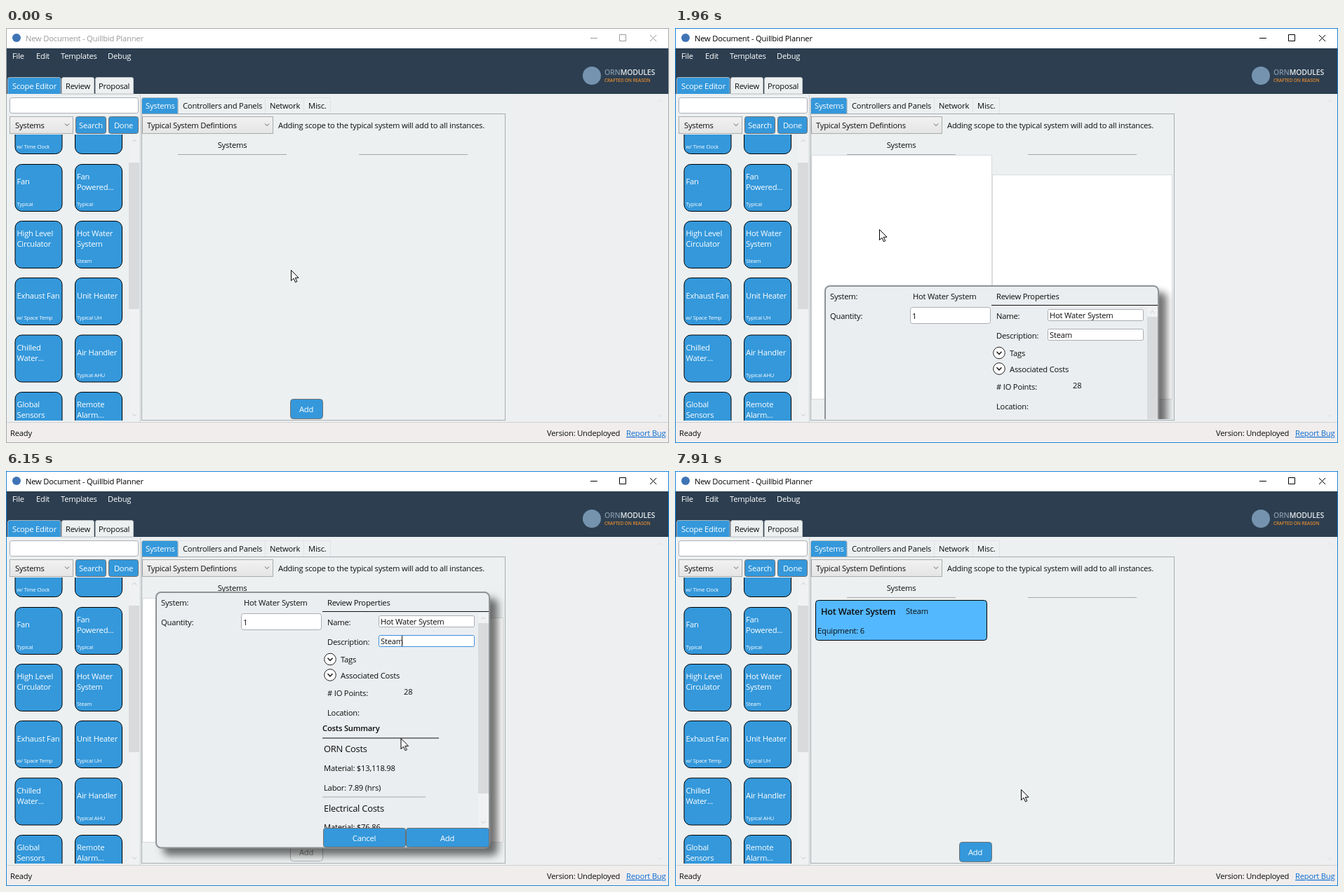
An HTML page for the animation above (7.99 s loop, 945 by 592 pixels).

```html
<!DOCTYPE html>
<html lang="en">
<head>
<meta charset="utf-8">
<title>Scope editor</title>
<style>
html, body { margin: 0; width: 100%; height: 100%; overflow: hidden; background: #ecf0f1; }
svg { display: block; width: 945px; height: 592px; }
text { font: 11.2px "Open Sans", "Noto Sans", sans-serif; letter-spacing: -.018em; fill: #0c0c0c; white-space: pre; }
.w, .tile text { fill: #fff; }
.mid { text-anchor: middle; }
.big { font-size: 12.9px; }
.bold { font-weight: 600; }
.tile .sub, .sub { font-size: 7.5px; }
.box { fill: #fff; stroke: #abadb3; }
.btn { fill: #3498db; stroke: #707070; }
.tab { fill: #3498db; stroke: #acb4ba; }
.combo { fill: url(#shade); stroke: #acacac; }
.thin { fill: none; stroke: #606060; }
.pale { fill: none; stroke: #c4c6c8; }
.rule { stroke: #a5a9ac; }
.ink { stroke: #111; }

/* one shared clock for every moving part */
.t { animation: none 7.99s step-end infinite; }
#caption { animation-name: wake; }
#frame { animation-name: frame; }
#arrow { animation-name: travel, arrow; }
#beam { animation-name: hop, beam; }
#drag { animation-name: drag; }
#lists { animation-name: lists; }
#item { animation-name: item; }
#itemText { animation-name: undim; }
#modal { animation-name: slide; }
#nameBox { animation-name: nameBox; }
#noteBox { animation-name: noteBox; }
#nameCaret { animation-name: nameCaret; }
#noteCaret { animation-name: noteCaret; }
#cancel { animation-name: cancel; }
#confirm { animation-name: confirm; }

@keyframes wake { 0% { color: #9a9a9a } 9.51%, 100% { color: #000 } }
@keyframes frame { 0% { stroke: #a6a9ab } 9.51%, 100% { stroke: #1883d7 } }
@keyframes drag { 0%, 21.15%, 100% { opacity: 0 } 10.51% { opacity: 1 } }
@keyframes lists { 0%, 90.36%, 100% { opacity: 0 } 23.26% { opacity: 1 } }
@keyframes item { 0% { opacity: 0 } 86.48%, 100% { opacity: 1 } }
@keyframes undim { 0% { opacity: .4 } 90.36%, 100% { opacity: 1 } }
@keyframes arrow { 0%, 74.71%, 100% { opacity: 1 } 37.79% { opacity: 0 } }
@keyframes beam { 0%, 74.71%, 100% { opacity: 0 } 37.79% { opacity: 1 } }
@keyframes nameBox { 0%, 62.07%, 100% { stroke: #abadb3 } 37.79% { stroke: #7eb4ea } 42.55% { stroke: #3d8fdd } }
@keyframes noteBox { 0%, 86.48%, 100% { stroke: #abadb3 } 57.07% { stroke: #7eb4ea } 62.07% { stroke: #3d8fdd } }
@keyframes nameCaret { 0%, 49.43%, 62.07%, 100% { opacity: 0 } 42.55%, 56.07% { opacity: 1 } }
@keyframes noteCaret { 0%, 68.96%, 82.47%, 100% { opacity: 0 } 62.07%, 75.59% { opacity: 1 } }
@keyframes cancel { 0%, 80.47%, 100% { fill: #3498db } 79.47% { fill: #bee6fd } }
@keyframes confirm { 0%, 90.36%, 100% { fill: #3498db } 80.47% { fill: #bee6fd } }
@keyframes slide {
  0%, 90.36%, 100% { transform: translateY(420px) }
  23.26% { transform: translateY(292px) }
  24.28% { transform: translateY(195px) }
  25.15% { transform: translateY(98px) }
  26.15% { transform: none }
  88.48% { transform: translateY(130px) }
  89.36% { transform: translateY(260px) }
}
@keyframes hop {
  0% { transform: translate(578px, 211px) }
  55.19% { transform: translate(578px, 211px); animation-timing-function: steps(4, start) }
  59.07%, 100% { transform: translate(577px, 247px) }
}
@keyframes travel {
  0% { transform: translate(406px, 345px) }
  4.75% { transform: translate(406px, 345px); animation-timing-function: steps(2, start) }
  6.63% { transform: translate(290px, 338px); animation-timing-function: steps(3, start) }
  9.51% { transform: translate(127px, 311px) }
  10.51% { transform: translate(127px, 311px); animation-timing-function: steps(5, start) }
  15.39% { transform: translate(161px, 286px); animation-timing-function: steps(2, start) }
  17.26% { transform: translate(233px, 282px); animation-timing-function: steps(1, start) }
  18.27% { transform: translate(269px, 280px); animation-timing-function: steps(3, start) }
  21.15% { transform: translate(291px, 287px) }
  33.16% { transform: translate(291px, 287px); animation-timing-function: steps(1, start) }
  34.16% { transform: translate(288px, 285px); animation-timing-function: steps(4, start) }
  37.79% { transform: translate(545px, 200px) }
  74.71% { transform: translate(577px, 247px); animation-timing-function: steps(6, start) }
  80.47% { transform: translate(548px, 515px); animation-timing-function: steps(3, start) }
  83.47% { transform: translate(617px, 512px) }
  84.6% { transform: translate(617px, 514px) }
  93.24% { transform: translate(617px, 514px); animation-timing-function: steps(3, start) }
  96.15% { transform: translate(545px, 450px); animation-timing-function: steps(2, start) }
  98.07% { transform: translate(505px, 444px); animation-timing-function: steps(2, start) }
  100% { transform: translate(481px, 464px) }
}
</style>
</head>
<body>
<svg viewBox="0 0 945 592">
<defs>
  <linearGradient id="shade" x2="0" y2="1"><stop stop-color="#f1f1f1"/><stop offset="1" stop-color="#e5e5e5"/></linearGradient>
  <rect id="card" x=".5" y=".5" width="67" height="67" rx="9.500" fill="#3498db" stroke="#000"/>
  <path id="down" d="M-3-1.5l3 3 3-3"/>
  <path id="up" d="M-3 1.5l3-3 3 3"/>
  <g id="expander"><circle r="8.3" fill="#fff" stroke="#222"/><path d="M-3.5-1.7l3.5 3.5 3.5-3.5" fill="none" stroke="#222" stroke-width="1.6"/></g>
  <clipPath id="side"><path d="M0 152h192v408H0z"/></clipPath>
  <clipPath id="stage"><path d="M194 123h517v435H194z"/></clipPath>
  <clipPath id="props"><path d="M450 202h240v307H450z"/></clipPath>
</defs>

<!-- window -->
<rect width="945" height="592" fill="#ecf0f1"/>
<rect width="945" height="29" fill="#fff"/>
<rect y="29" width="945" height="65" fill="#2c3e50"/>
<circle cx="15" cy="14" r="6" fill="#3f74b5"/>
<g id="caption" class="t">
  <text x="28" y="19" style="fill:currentColor">New Document - Quillbid Planner</text>
  <path d="M833 14.5h10M874.500 9.500h9v9h-9zM918 10l9 9m0-9l-9 9" fill="none" stroke="currentColor"/>
</g>
<text class="w" x="9" y="44">File</text><text class="w" x="43" y="44">Edit</text>
<text class="w" x="78" y="44">Templates</text><text class="w" x="145" y="44">Debug</text>
<circle cx="835" cy="68" r="13" fill="#7593ae"/>
<text x="853" y="67" class="bold" style="font-size:10.500px;fill:#e4e8eb"><tspan fill="#8296a8">ORN</tspan>MODULES</text>
<text x="853" y="77" class="bold" style="font-size:6.500px;fill:#e0892f">CRAFTED ON REASON</text>

<path class="tab" d="M2.500 94V73q0-2.500 2.500-2.500h70.500q2.500 0 2.500 2.500v21"/>
<path d="M79.500 94V73q0-2.500 2.500-2.500h41q2.500 0 2.500 2.500v21zM127.500 94V73q0-2.500 2.500-2.500h49q2.500 0 2.500 2.500v21z" fill="#ecf0f1" stroke="#b8bcbf"/>
<text class="w" x="9" y="87">Scope Editor</text><text x="85" y="87">Review</text><text x="132" y="87">Proposal</text>

<!-- right pane and status bar -->
<path d="M714 95h230v467H714z" fill="#eeeff0"/>
<g class="pale" style="stroke:#dcdedf"><use href="#up" x="933" y="104"/><use href="#down" x="933" y="553"/></g>
<path d="M0 562h945v30H0z" fill="#f1eded"/><path d="M0 562.500h945" stroke="#d0d2d3"/>
<text x="6" y="582">Ready</text><text x="771" y="582">Version: Undeployed</text>
<text x="884" y="582" style="fill:#0a6bd0;text-decoration:underline">Report Bug</text>

<!-- sidebar -->
<rect class="box" x="5.500" y="99.500" width="183" height="22" rx="3"/>
<rect class="combo" x="5.500" y="126.500" width="90" height="24"/>
<text x="13" y="143">Systems</text><use href="#down" x="87" y="138" class="thin"/>
<rect class="btn" x="99.500" y="126.500" width="43" height="24" rx="3"/>
<rect class="btn" x="146.500" y="126.500" width="42" height="24" rx="3"/>
<text class="w mid" x="121" y="143">Search</text><text class="w mid" x="167.500" y="143">Done</text>
<path d="M175 152h15v408h-15z" fill="#eff1f2"/><path d="M175 192h15v209h-15z" fill="#d8dadb"/>
<g class="pale"><use href="#up" x="183" y="161"/><use href="#down" x="183" y="552"/></g>
<g clip-path="url(#side)">
  <g class="tile" transform="translate(12.500 112)"><use href="#card"/><text class="sub" x="3" y="60">w/ Time Clock</text></g>
  <g class="tile" transform="translate(98 112)"><use href="#card"/></g>
  <g class="tile" transform="translate(12.500 194)"><use href="#card"/><text x="3" y="29">Fan</text><text class="sub" x="3" y="59.500">Typical</text></g>
  <g class="tile" transform="translate(98 194)"><use href="#card"/><text x="3" y="22">Fan<tspan x="3" dy="15">Powered...</tspan></text><text class="sub" x="3" y="59.500">Typical</text></g>
  <g class="tile" transform="translate(12.500 275)"><use href="#card"/><text x="3" y="22">High Level<tspan x="3" dy="15">Circulator</tspan></text></g>
  <g class="tile" transform="translate(98 275)"><use href="#card"/><text x="3" y="22">Hot Water<tspan x="3" dy="15">System</tspan></text><text class="sub" x="3" y="60">Steam</text></g>
  <g class="tile" transform="translate(12.500 356)"><use href="#card"/><text x="3" y="29.500">Exhaust Fan</text><text class="sub" x="3" y="60">w/ Space Temp</text></g>
  <g class="tile" transform="translate(98 356)"><use href="#card"/><text x="3" y="29.500">Unit Heater</text><text class="sub" x="3" y="60">Typical UH</text></g>
  <g class="tile" transform="translate(12.500 437.500)"><use href="#card"/><text x="3" y="22">Chilled<tspan x="3" dy="15">Water...</tspan></text></g>
  <g class="tile" transform="translate(98 437.500)"><use href="#card"/><text x="3" y="29.500">Air Handler</text><text class="sub" x="3" y="60">Typical AHU</text></g>
  <g class="tile" transform="translate(12.500 519)"><use href="#card"/><text x="3" y="22">Global<tspan x="3" dy="15">Sensors</tspan></text></g>
  <g class="tile" transform="translate(98 519)"><use href="#card"/><text x="3" y="22">Remote<tspan x="3" dy="15">Alarm...</tspan></text></g>
</g>
<path d="M191.500 95v467" stroke="#c9cdcf"/>

<!-- main panel -->
<rect x="193.500" y="122.500" width="518" height="437" fill="#ecf0f1" stroke="#a9adb0"/>
<path d="M245.500 122V99.500H369.500V122M369.500 99.500h55V122M424.500 99.500h38V122" fill="none" stroke="#dfe3e5"/>
<path class="tab" d="M193.500 122v-20q0-2.500 2.500-2.500h46.500q2.500 0 2.500 2.500v20"/>
<text class="w" x="199" y="115">Systems</text><text x="252" y="115">Controllers and Panels</text>
<text x="376" y="115">Network</text><text x="431" y="115">Misc.</text>
<rect class="combo" x="194.500" y="126.500" width="186" height="24"/>
<text x="201" y="143">Typical System Defintions</text><use href="#down" x="372" y="138" class="thin"/>
<text x="388" y="143">Adding scope to the typical system will add to all instances.</text>
<text class="mid" x="322.500" y="171">Systems</text>
<path class="rule" d="M245 180.500h155M503 180.500h155"/>
<rect class="btn" x="405.500" y="529.500" width="46" height="28" rx="4"/>
<text class="w mid" x="428" y="548">Add</text>
<g id="lists" class="t">
  <path d="M194.500 181.500h257v348h-257zM452.500 209.500h256v320h-256z" fill="#fff" stroke="#d9dbdc"/>
  <path d="M194 530h516v28H194z" fill="#ecf0f1"/>
  <rect x="405.500" y="529.500" width="46" height="27" rx="4" fill="#f2f3f3" stroke="#adb2b5"/>
  <text class="mid" x="428" y="548" style="fill:#838383">Add</text>
</g>
<g id="item" class="t">
  <rect x="200.500" y="184.500" width="244" height="57" rx="4" fill="#54b8ff" stroke="#000"/>
  <g id="itemText" class="t">
    <text x="208" y="205" class="bold" style="font-size:12.700px">Hot Water System</text>
    <text x="329" y="204">Steam</text><text x="203" y="232">Equipment: 6</text>
  </g>
</g>

<!-- review dialog -->
<g clip-path="url(#stage)">
<g id="modal" class="t">
  <rect x="214" y="173" width="475" height="364.500" rx="7" fill="#ebeef0" stroke="#8f9396" stroke-width="2" style="filter:drop-shadow(11px 10px 5.5px rgba(0,0,0,.55))"/>
  <text x="221" y="192">System:</text><text x="339" y="192">Hot Water System</text>
  <text x="221" y="220">Quantity:</text>
  <rect class="box" x="335.500" y="203.500" width="114" height="23" rx="3"/><text x="338" y="220">1</text>
  <text x="458" y="192">Review Properties</text><path class="ink" d="M451 200.500h237"/>
  <text x="458" y="220">Name:</text><text x="458" y="248">Description:</text>
  <rect id="nameBox" class="box t" x="531.500" y="206.500" width="136" height="16" rx="2"/>
  <rect id="noteBox" class="box t" x="531.500" y="234.500" width="136" height="16" rx="2"/>
  <text x="534" y="219">Hot Water System</text><text x="534" y="247">Steam</text>
  <path id="nameCaret" class="ink t" d="M574.500 207v15"/>
  <path id="noteCaret" class="ink t" d="M564.500 235v15"/>
  <use href="#expander" x="462" y="268.500"/><text x="477" y="273">Tags</text>
  <use href="#expander" x="462" y="291"/><text x="477" y="296">Associated Costs</text>
  <text x="458" y="321"># IO Points:</text><text x="567" y="319">28</text>
  <text x="458" y="349">Location:</text>
  <text x="451" y="371" class="bold">Costs Summary</text><path class="ink" d="M451 381h166"/>
  <text x="453" y="401" class="big">ORN Costs</text>
  <text x="453" y="428">Material: $13,118.98</text><text x="453" y="456">Labor: 7.89 (hrs)</text>
  <path class="rule" d="M451 465h147"/>
  <text x="453" y="485.500" class="big">Electrical Costs</text>
  <g clip-path="url(#props)"><text x="453" y="512">Material: $76.86</text></g>
  <path d="M673 202h15v306h-15z" fill="#eff1f2"/><path d="M673 217h15v243h-15z" fill="#d8dadb"/>
  <g class="pale"><use href="#up" x="680.500" y="210"/><use href="#down" x="680.500" y="501"/></g>
  <rect id="cancel" class="btn t" x="452.500" y="509.500" width="117" height="27" rx="3"/>
  <rect id="confirm" class="btn t" x="570.500" y="509.500" width="118" height="27" rx="3"/>
  <text class="w mid" x="510.500" y="527.500">Cancel</text><text class="w mid" x="629" y="527.500">Add</text>
</g>
</g>

<rect id="frame" class="t" x=".5" y=".5" width="944" height="591" fill="none"/>

<!-- pointers -->
<g id="beam" class="t"><path d="M-3-6.500h2.500l.5.500.5-.5H3M0-6V6M-3 6.500h2.500L0 6l.5.500H3" fill="none" stroke="#000" stroke-width="1.200"/></g>
<g id="arrow" class="t">
  <g id="drag" class="t">
    <g transform="translate(-4 -72)"><use href="#card"/><text x="3" y="22">Hot Water<tspan x="3" dy="15">System</tspan></text><text class="sub" x="3" y="60" style="fill:#173c57">Steam</text></g>
    <rect x="2.500" y="14.500" width="11" height="7" fill="none" stroke="#222" stroke-dasharray="1 1"/>
    <rect x="10.500" y="18.500" width="9" height="9" fill="#fff" stroke="#000"/>
    <path d="M12.500 23h5M15 20.500v5" stroke="#000"/>
  </g>
  <path d="M.5.500v15l3.500-3.300 2.500 5.500 2.300-1-2.500-5.400h4.700z" fill="#fff" stroke="#000"/>
</g>
</svg>
</body>
</html>
```
